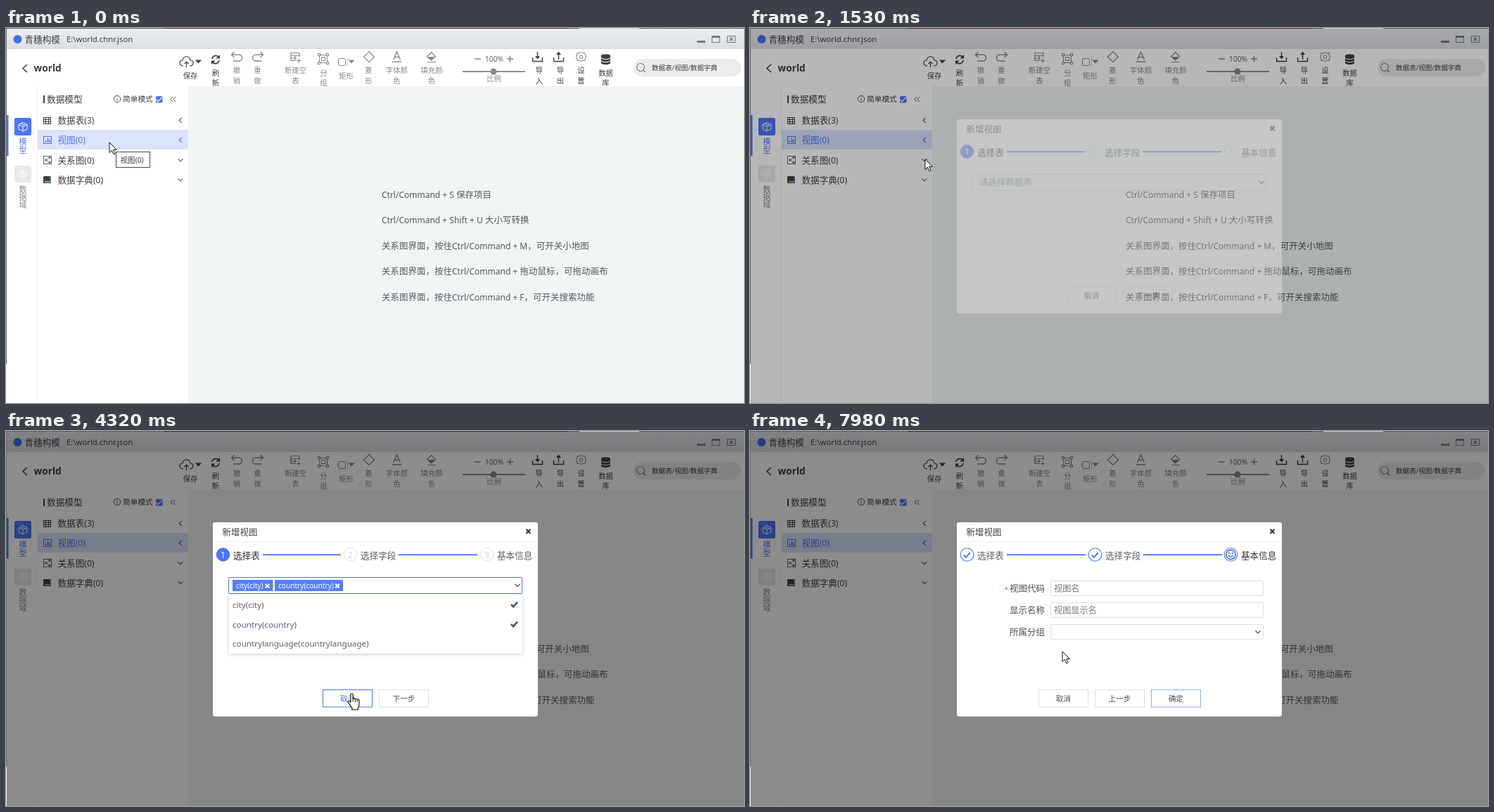
These frames come from a looping animation (1049x534 px, 8 s). An HTML page:

```html
<!DOCTYPE html>
<html lang="zh-CN">
<head>
<meta charset="utf-8">
<title>新增视图</title>
<style>
html, body { margin: 0; width: 100%; height: 100%; overflow: hidden; background: #fff }
svg { display: block; width: 100vw; height: 100vh }
text { font-family: "Noto Sans", "Noto Sans CJK SC", "Noto Sans CJK", sans-serif; white-space: pre }
.latin { font-size: .96em }
.mid { text-anchor: middle }
.end { text-anchor: end }
.medium { font-weight: 500 }
.bold { font-weight: 600 }
.btn rect { fill: #fff; stroke: #dcdfe6 }
.btn text { fill: #4c4c4c }
.btn.on rect { stroke: #4d75f8 }
.btn.on text { fill: #4d75f8 }
.btn.fading rect { stroke: #93aaf6 }
</style>
</head>
<body>
<svg id="stage" viewBox="0 0 1049 534"></svg>
<script>
const LOOP = 8000, BLUE = '#4d75f8', DARK = '#3c3f44', GREY = '#85888d';

// Drawing helpers. Text is placed by its vertical centre.
const text = (x, y, s, size = 12.5, fill = DARK, cls = '') =>
  `<text x="${x}" y="${y + size * .37}" font-size="${size}" fill="${fill}" class="${cls}">` +
  (/[^ -~]/.test(s) ? s.replace(/[ -~]+/g, m => `<tspan class="latin">${m}</tspan>`) : s) + '</text>';
const rect = (x, y, w, h, fill, more = '') =>
  `<rect x="${x}" y="${y}" width="${w}" height="${h}" fill="${fill}" ${more}/>`;
const box = (x, y, w, h, stroke, fill = 'none', r = 0) =>
  rect(x + .5, y + .5, w - 1, h - 1, fill, `stroke="${stroke}" rx="${r}"`);
const line = (d, stroke = DARK, w = 1.2, fill = 'none') =>
  `<path d="${d}" stroke="${stroke}" stroke-width="${w}" fill="${fill}"/>`;
const fill = (d, color = DARK) => `<path d="${d}" fill="${color}"/>`;
const ring = (x, y, r, stroke = DARK, w = 1.2, inside = 'none') =>
  `<circle cx="${x}" cy="${y}" r="${r}" stroke="${stroke}" stroke-width="${w}" fill="${inside}"/>`;
const stack = (x, y, s, color = GREY, gap = 14.5, size = 10.3) =>
  s.split(' ').map((row, i) => text(x, y + i * gap, row, size, color, 'mid')).join('');
const during = (times, body) => `<g data-show="${times}">${body}</g>`;
const down = (x, y, c = DARK) => line(`M${x - 3.5} ${y - 1.7}l3.5 3.5 3.5-3.5`, c);
const left = (x, y, c = DARK) => line(`M${x + 1.7} ${y - 3.5}l-3.5 3.5 3.5 3.5`, c);
const caret = (x, y, c = DARK) => fill(`M${x - 4.5} ${y - 2}h9l-4.5 5z`, c);
const tick = (x, y, c, w = 2) => line(`M${x - 4.5} ${y}l3 3.2 6-6.5`, c, w);
const cross = (x, y, r, c, w = 2) =>
  line(`M${x - r} ${y - r}l${2 * r} ${2 * r}m0 ${-2 * r}l${-2 * r} ${2 * r}`, c, w);
const lens = (x, y) => ring(x, y, 5.5, '#777', 1.1) + line(`M${x + 4} ${y + 4}l3 3`, '#777');

function titleBar() {
  return rect(0, 0, 1049, 30, 'url(#bar)') +
    `<circle cx="16.5" cy="16" r="6" fill="#3f70ea"/>` +
    text(26.5, 16, '青穗构模', 12.6) + text(86, 16, 'E:\\world.chnr.json', 11.3) +
    rect(982, 18, 12, 3, '#777c8a') + box(1003, 11, 12, 10, '#777c8a') + rect(1003, 11, 12, 3, '#777c8a') +
    box(1025, 11, 12, 10, '#777c8a') + cross(1031, 16, 2.3, '#777c8a', 1.6);
}

// Whatever lies behind the window shows as a thin edge, untouched by the mask.
const windowEdge = () => rect(0, 0, 1049, 1, '#5f5e64') + rect(225, 0, 575, 1, '#4a2a34') +
  rect(815, 0, 85, 1, '#d6cdd0') + rect(0, 1, 1, 477, '#66686d') + rect(0, 478, 1, 56, '#f4f4f4');

function toolBar() {
  return rect(0, 29, 1049, 54, '#fff') + rect(0, 29, 1049, 1, '#d4d7dc') +
    line('M30 52l-6 5.500 6 5.500', DARK, 1.5) + text(39.5, 57, 'world', 13.7, DARK, 'bold') +
    line('M252 54c-7-1-6-8-1-8 1-7 10-7 11 0 6 0 5 8-1 8M256.500 56v-8m-3 3l3-3 3 3', DARK, 1.2) +
    caret(273.5, 47.5) + stack(262, 68, '保存', DARK) +
    line('M293 44a5.300 5.300 0 0 1 9.500-2.500M303 46a5.300 5.300 0 0 1-9.500 2.500', DARK, 1.7) +
    fill('M304 38v5.500h-5.500zM292 52v-5.500h5.500z') + stack(298, 64, '刷 新', DARK) +
    line('M324.500 34l-4 4 4 4M321 38h10a4.500 4.500 0 0 1 0 9h-8', GREY, 1.4) + stack(328, 60.5, '撤 销') +
    line('M361.500 34l4 4-4 4M365 38h-10a4.500 4.500 0 0 0 0 9h8', GREY, 1.4) + stack(357.5, 60.5, '重 做') +
    line('M417 41v-5.500h-12v11h6M405 39.500h12M411 39.500v7M405 43h8M416 43.500v6m-3-3h6', GREY) +
    stack(411.5, 60.5, '新建空 表') +
    box(445, 38, 12, 12, GREY) + box(448, 41, 6, 6, GREY) +
    [[443, 36], [455, 36], [443, 48], [455, 48]].map(([x, y]) => box(x, y, 4, 4, GREY, '#fff')).join('') +
    stack(451.5, 64, '分 组') +
    box(472, 43, 11, 11, GREY, 'none', 2) + line('M485.500 42v13', '#ccc', 1) + caret(491, 47.5, GREY) +
    stack(483.5, 68, '矩形') +
    line('M516 33.500l7.500 7.500-7.500 7.500-7.500-7.500z', GREY) + stack(515.5, 60.5, '菱 形') +
    line('M550.500 45l5-11 5 11M552.500 41.500h6M549 48h13', GREY, 1.4) + stack(555.5, 60.5, '字体颜 色') +
    line('M604 34l6.500 6.500-6 5.500-6-5.500 6.500-6M599 48.500h12', GREY) +
    fill('M599 41h11l-5.500 5z', GREY) + stack(605, 60.5, '填充颜 色') +
    line('M666 44h9M712 44h9m-4.500-4.500v9', GREY, 1.6) + text(694, 44.5, '100%', 10.4, '#66696e', 'mid') +
    rect(649, 61, 89, 2, '#8d9096') + `<circle cx="693" cy="62" r="4.500" fill="#85888d"/>` + stack(693.5, 72.5, '比例') +
    line('M748.500 42v5.500h14V42M755.500 34v9', DARK, 1.4) + fill('M752 40h7l-3.500 4.500z') + stack(758, 60.5, '导 入', DARK) +
    line('M778.500 42v5.500h14V42M785.500 36v9', DARK, 1.4) + fill('M782 38h7l-3.500-4.500z') + stack(788, 60.5, '导 出', DARK) +
    line('M817.500 34l2 2 3.500-.5.500 3.500 1 2-1 2-.500 3.500-3.500-.500-2 2-2-2-3.500.500-.500-3.500-1-2 1-2 .500-3.500 3.500.500z', '#77797e', 1) +
    ring(817.5, 41, 2.3, '#77797e', 1) + stack(817.5, 60.5, '设 置', DARK) +
    [0, 4, 8].map(d => fill(`M846 ${39.5 + d}q6.500 3.500 13 0v3q-6.500 3.500-13 0z`)).join('') +
    `<ellipse cx="852.500" cy="39.500" rx="6.500" ry="2.300" fill="${DARK}"/>` + stack(852.5, 64, '数据 库', DARK) +
    rect(892, 44, 153, 25, '#ececec', 'rx="12"') + lens(902, 56) + text(918, 56.5, '数据表/视图/数据字典', 9.6);
}

function sideBar() {
  const rows = [['数据表(3)', 131.5, left], ['视图(0)', 159.5, left], ['关系图(0)', 188, down], ['数据字典(0)', 216, down]];
  return rect(0, 83, 259, 451, '#fff') + rect(44, 83, 1, 451, '#f0f1f3') +
    rect(1, 124, 2.5, 58, BLUE) + rect(12, 128, 24, 25, BLUE, 'rx="2"') +
    line('M24 134.500l6 3v6.500l-6 3-6-3v-6.500zM18 137.500l6 3 6-3M24 140.500v6.500M21 136l6 3', '#fff', 1) +
    stack(24, 162, '模 型', BLUE, 12, 11) +
    rect(12, 196, 24, 24, '#e9e9e9', 'rx="2"') + ring(24, 208, 5.5, '#fff', 1) +
    line('M18.500 208h11M24 202.500v11M20 204.500q4 3 8 0M20 211.500q4-3 8 0', '#fff', .8) +
    stack(24, 230, '数 据 域', GREY, 11.2, 11) +
    rect(53, 96, 2, 11, DARK) + text(58, 101.5, '数据模型', 12.7) +
    ring(158, 101, 4.7, '#555', 1) + line('M158 98v1.200m0 1v3.500', '#555', 1) + text(166, 101.5, '简单模式', 10.7) +
    rect(213, 97, 9.5, 9.5, BLUE, 'rx="1.5"') + tick(217.5, 101.7, '#fff', 1.3) +
    line('M237 98l-3 3.500 3 3.500m4-7l-3 3.500 3 3.500', '#555', 1) +
    rect(45, 145, 214, 28, '#dbe4ff') +
    rows.map(([s, y, arrow], i) =>
      text(73.5, y, s, 12.6, i == 1 ? BLUE : DARK, 'medium') + arrow(248, y, i == 1 ? BLUE : '#666')).join('') +
    box(53, 127, 11, 10, DARK) + line('M53 130.500h11M53 133.500h11M56.500 128v9M60.500 128v9', DARK, 1) +
    box(53, 154, 12, 11, BLUE) + line('M56.500 163v-3M59.500 163v-6M62 163v-4', BLUE, 1.5) +
    box(53, 182, 12, 12, '#666') + line('M62 184.500l-5.500 3.500 5.500 3.500', '#666', 1) +
    ring(56.5, 188, 1, '#666') + ring(62, 184.5, .8, '#666') + ring(62, 191.5, .8, '#666') +
    rect(53, 211, 11, 10, DARK, 'rx="1"') + rect(55, 218.5, 9, 1, '#fff') + rect(62, 211, 2, 8, '#4f83a8');
}

function hints() {
  return rect(259, 83, 790, 451, '#f1f5f6') + [
    'Ctrl/Command + S 保存项目', 'Ctrl/Command + Shift + U 大小写转换',
    '关系图界面，按住Ctrl/Command + M，可开关小地图',
    '关系图界面，按住Ctrl/Command + 拖动鼠标，可拖动画布',
    '关系图界面，按住Ctrl/Command + F，可开关搜索功能'
  ].map((s, i) => text(534, 237 + i * 36.5, s, 12.5, '#56595d')).join('');
}

function menu() {
  const hover = rect(147, 163, 177, 28.5, '#dbe4ff');
  const items = ['复制视图组', '剪切视图组', '粘贴视图组'];
  return rect(147, 163, 177, 139, '#fff', 'filter="url(#shadow)"') + during('720-1400', hover) +
    line('M161 178h10m-5-5v10', BLUE, 2) + text(179, 178, '新增视图', 12.5, BLUE) +
    items.map((s, i) => text(182, 206 + i * 27.5, s, 12.6)).join('') +
    box(161, 199, 9, 10, '#555') + box(164, 202, 9, 10, '#555', '#fff') +
    line('M162 229l10 7M162 237l10-7', '#777', 1) + ring(163, 230, 1.7, '#777', 1) + ring(163, 236.5, 1.7, '#777', 1) +
    rect(161, 255, 8, 10, DARK) + box(165, 257, 8, 10, DARK, '#fff') +
    line('M161 288h10', DARK, 2) + text(179.5, 288, '删除视图组', 12.6);
}

function step(x, n, label, state) {
  const mark = state == 2 ? ring(x, 176, 9.3, BLUE, 1.1, '#fff') + tick(x, 176.5, BLUE)
    : state == 3 ? ring(x, 176, 9.3, BLUE, 1.1, '#fff') + ring(x, 176, 6.6, BLUE, 1.7) +
      line(`M${x - 3.3} 177q3.300 4.500 6.600 0M${x - 2.5} 172.500v2.500m5-2.500v2.500`, BLUE, 1.5)
    : ring(x, 176, 9.3, state ? BLUE : '#dfe3ea', 1, state ? BLUE : '#fff') +
      text(x, 176.5, n, 12, state ? '#fff' : '#d3d7de', 'mid');
  return mark + text(x + 14.5, 177, label, 12.6, state % 2 ? '#2e3033' : '#5e6166');
}
const steps = (a, b, c, dx = 0) =>
  rect(365, 175.3, 111 + dx, 1.9, BLUE) + rect(558 + dx, 175.3, 112, 1.9, BLUE) +
  step(308.5, '1', '选择表', a) + step(489.5 + dx, '2', '选择字段', b) + step(683.5, '3', '基本信息', c);

const button = (x, label, on = '', cls = '') =>
  `<g class="btn ${cls}" data-on="${on}"><rect x="${x + .5}" y="368.500" width="70" height="24.500"/>` +
  text(x + 35.5, 381.5, label, 10.6, '#4c4c4c', 'mid') + '</g>';

function option(y, s, times) {
  return text(322, y, s, 11.65, '#5a6072') + (times ? during(times, tick(722.5, y - .5, '#4c597a', 2.7)) : '');
}
const tag = (x, w, s) => rect(x, 212, w, 16, '#567efb') + text(x + 5, 220.5, s, 10.1, '#fff') +
  cross(x + w - 8, 220.5, 2.8, '#fff', 2.2);
const bar = (x, times) => during(times, rect(x, 212, 1.3, 14.5, '#222'));

function pickTables() {
  const list = dy => `<g transform="translate(0 ${dy})">` +
    rect(317, 232, 417, 84, '#fff', 'filter="url(#shadow)"') +
    option(246.5, 'city(city)', '3310-4940') + option(274.5, 'country(country)', '3620-4940') +
    option(302, 'countrylanguage(countrylanguage)') +
    during('2340-3780', rect(317, 232, 417, 28, '#567efb') + text(322, 246.5, 'city(city)', 11.65, '#fff') +
      during('3310-3780', tick(722.5, 246, '#fff', 2.7))) + '</g>';
  return steps(1, 0, 0) +
    box(316, 208, 418, 24, '#d9d9d9', '#fff', 1) + during('2200-4940', box(316, 208, 418, 24, BLUE, 'none', 1)) +
    during('0-3310', text(326, 219.5, '请选择数据表', 12.5, '#8f9298')) + down(727, 219.5) +
    bar(324, '2200-2970') +
    during('3310-4940', tag(322, 57.5, 'city(city)')) + during('3620-4940', tag(382, 97, 'country(country)')) +
    bar(382, '3310-3620') + bar(482, '3620-4110,4600-4940') +
    during('2270-3310', list(0)) + during('3310-4940', list(1)) +
    button(450, '取消', '3970-4560') + button(530, '下一步', '4640-4940');
}

function pickFields() {
  const row = (y, s, checked) => fill(`M323 ${y - 3.5}l5 3.500-5 3.500z`) +
    box(335, y - 5, 10, 10, '#777', '#fff', 1.5) + text(348, y, s, 11.8, '#55585c') +
    during(checked, rect(335, y - 5, 10, 10, BLUE, 'rx="1.5"') + tick(339.5, y, '#fff', 1.3));
  return steps(2, 1, 0) + rect(321, 213, 409, 25, '#eaeaea', 'rx="11"') + lens(331, 225) +
    text(347, 225.5, '字段代码/显示名称', 9.6) +
    row(248.5, 'city-', '6270-7840') + row(268.5, 'country-', '6600-7840') +
    button(410, '取消') + button(490, '上一步') + button(570, '下一步', '7040-7840');
}

function basics() {
  const field = (y, label, hint) => text(419, y, label, 12.5, '#4a4d51', 'end') +
    box(427, y - 11, 303, 22, '#dcdfe6', '#fff', 1) + text(432, y, hint, 12.2, '#77797d');
  return steps(2, 2, 3, 1) + text(362, 225.5, '*', 9, '#f0453c') +
    field(224, '视图代码', '视图名') + field(255, '显示名称', '视图显示名') + field(286, '所属分组', '') +
    down(722, 286) + button(410, '取消') + button(490, '上一步') + button(570, '确定', '', 'fading');
}

const ARROW = 'M0 0v14.500l3.400-3.200 2.500 5.600 2.300-1-2.500-5.400h4.700z';
const HAND = 'M-1.500 1q1.500-2 3 0v6q1.500-1.500 3 .300 1.500-1.200 2.800.500 2.500-.500 2.500 1.700v5.500q0 2-1.500 4v2.500h-8v-2.500q-2-2-5.500-8 .200-2.300 3.700.300z';
const CLICKS = '330-430,1270-1400,2130-2270,3170-3300,3480-3620,4800-4940,6130-6270,6480-6600,7700-7840';
const HANDS = '1850-3850,3950-4540,4620-5000,5600-6620,7000-7840';
const ARROWS = '0-1850,3850-3950,4540-4620,5000-5600,6620-7000,7840-8000';

const stage = document.getElementById('stage');
stage.innerHTML =
  `<defs><linearGradient id="bar" x2="0" y2="1"><stop stop-color="#eceef1"/><stop offset="1" stop-color="#dbdee3"/></linearGradient>
  <filter id="shadow" x="-10%" y="-20%" width="120%" height="140%"><feDropShadow dx="0" dy="1" stdDeviation="2.500" flood-opacity=".2"/></filter></defs>` +
  hints() + sideBar() + toolBar() + titleBar() +
  during('0-70', box(156, 176, 49, 23, '#44474c', '#fff') + text(162.5, 188, '视图(0)', 10.6)) +
  during('430-1400', menu()) +
  `<g id="mask">${rect(0, 0, 1049, 534, '#000', 'opacity=".45"')}</g>${windowEdge()}<g id="dialog">` +
  rect(294, 130, 462, 276.5, '#fff', 'rx="3"') + text(307.5, 144.5, '新增视图', 12.5) +
  cross(742.5, 143, 3, DARK, 2.3) + rect(294, 157, 462, 1, '#ebedf0') +
  during('1400-4940', pickTables()) + during('4940-7840', pickFields()) + during('7840-8000', basics()) + '</g><g id="pointer">' +
  during(CLICKS, '<circle r="10.500" fill="#e9e53c" opacity=".75"/>') +
  during(ARROWS, line(ARROW, '#111', 1, '#fff')) +
  during(HANDS, '<g transform="translate(.5 0) scale(1.06)">' + line(HAND, '#111', 1.1, '#fff') +
    line('M1.500 7v4M4.500 7.500v4M7.300 8v3.500', '#111', .9) + '</g>') + '</g>';

// Pointer stops: time, x, y
const PATH = [
  [0, 147, 163], [680, 147, 163], [1060, 232, 181], [1200, 238, 185], [1470, 238, 185],
  [1890, 430, 218], [2300, 430, 218], [2560, 434, 258], [3240, 434, 258], [3420, 396, 267],
  [3740, 396, 267], [3970, 480, 372], [4320, 491, 374], [4500, 491, 374], [4780, 562, 379],
  [4940, 562, 379], [5290, 452, 309], [5650, 328, 248], [5730, 328, 248], [5860, 343, 253],
  [6280, 343, 253], [6410, 342, 270], [6600, 342, 270], [6820, 536, 355], [7100, 600, 380],
  [7770, 600, 380], [7970, 444, 314], [8000, 444, 314]
];
const spans = s => s.split(',').filter(Boolean).map(p => p.split('-').map(Number));
const timed = key => [...stage.querySelectorAll(`[data-${key}]`)].map(el => [el, spans(el.dataset[key])]);
const shown = timed('show'), lit = timed('on');
const [mask, dialog, pointer] = ['mask', 'dialog', 'pointer'].map(id => document.getElementById(id));
const inside = (list, t) => list.some(([a, b]) => t >= a && t < b);
const ramp = (t, from, length) => Math.min(1, Math.max(0, (t - from) / length));

function draw() {
  const t = performance.now() % LOOP;
  for (const [el, list] of shown) el.style.display = inside(list, t) ? '' : 'none';
  for (const [el, list] of lit) el.classList.toggle('on', inside(list, t));
  mask.style.opacity = ramp(t, 1400, 210);
  dialog.style.opacity = ramp(t, 1470, 210);
  const i = PATH.findIndex(p => p[0] > t), [t0, x0, y0] = PATH[i - 1], [t1, x1, y1] = PATH[i];
  const p = ramp(t, t0, t1 - t0), e = p * p * (3 - 2 * p);
  pointer.setAttribute('transform', `translate(${x0 + (x1 - x0) * e} ${y0 + (y1 - y0) * e})`);
  requestAnimationFrame(draw);
}
draw();
</script>
</body>
</html>
```
